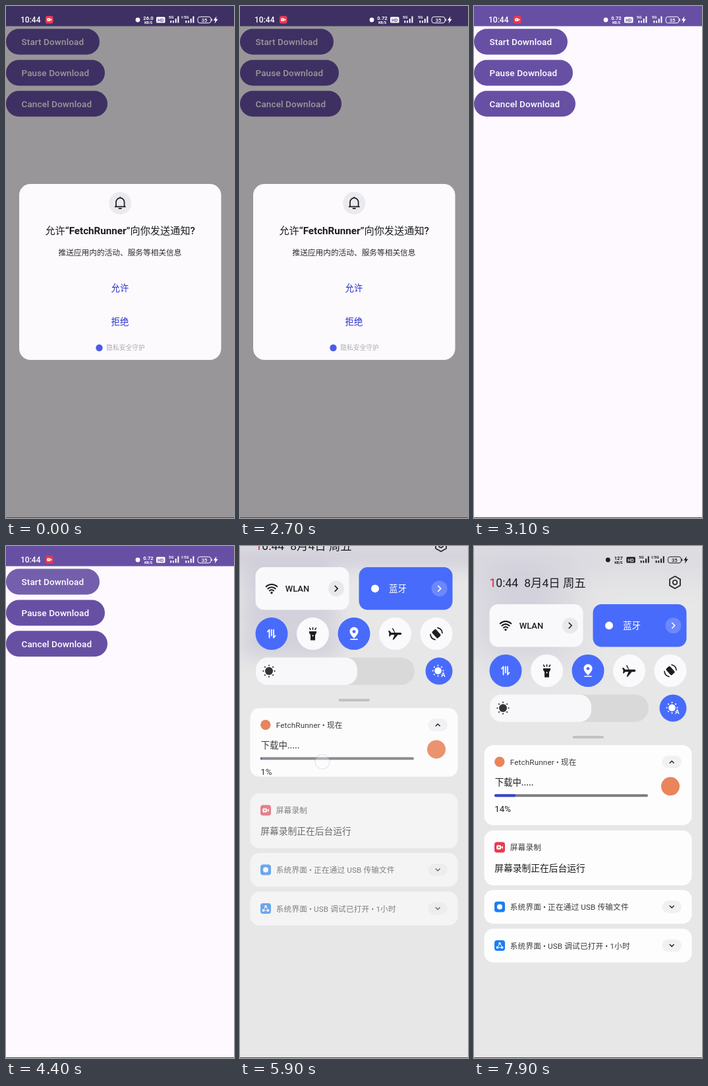
These frames come from a looping animation (346 px wide and 774 px high, 8 s). An HTML page:

```html
<!DOCTYPE html>
<html lang="zh-CN">
<head>
<meta charset="utf-8">
<style>
html, body { margin: 0; width: 100%; height: 100%; overflow: hidden; background: #fef9ff; }
svg { display: block; width: 100%; height: 100%; font-family: Roboto, "Noto Sans CJK SC", "Noto Sans CJK", sans-serif; }
text { white-space: pre; }
</style>
</head>
<body>
<svg id="stage" viewBox="0 0 346 774"></svg>
<script>
const APP = 'FetchRunner', PURPLE = '#6750a4', BLUE = '#486bfb', INK = '#1d1d21', ORANGE = '#e9845b';

const rect = (x, y, w, h, r, fill, more = '') =>
  `<rect x="${x}" y="${y}" width="${w}" height="${h}" rx="${r}" fill="${fill}" ${more}/>`;
const circle = (x, y, r, fill, more = '') => `<circle cx="${x}" cy="${y}" r="${r}" fill="${fill}" ${more}/>`;
const text = (x, y, size, fill, str, more = '') =>
  `<text x="${x}" y="${y}" font-size="${size}" fill="${fill}" ${more}>${str}</text>`;
const line = (d, color, w, more = '') =>
  `<path d="${d}" fill="none" stroke="${color}" stroke-width="${w}" stroke-linecap="round" stroke-linejoin="round" ${more}/>`;
const shape = (d, fill, more = '') => `<path d="${d}" fill="${fill}" ${more}/>`;
const at = (x, y, body, more = '') => `<g transform="translate(${x} ${y})" ${more}>${body}</g>`;
const MID = 'text-anchor="middle"', BOLD = 'font-weight="700"', MEDIUM = 'font-weight="500"';

function recorder(x, y, s) {
  return at(x, y, `<g transform="scale(${s / 16})">` + rect(0, 0, 16, 16, 4, '#e83a50') +
    rect(3.2, 4.8, 7, 6.4, 1.6, '#fff') + shape('M10 8 13 5.5V10.5Z', '#fff') +
    circle(6.7, 8, 1.2, '#e83a50') + '</g>');
}

function signal(x, color) {
  return text(x, 19.3, 6, color, '5G', BOLD) +
    [3.6, 3.6, 6.5, 10].map((h, i) => rect(x + 2.3 + i * 3.7, 25.6 - h, 2, h, .6, color)).join('');
}

function statusIcons(dx, color, back) {
  return at(dx, 0,
    circle(200, 21, 3.4, color) +
    text(216, 20.7, 7.6, color, '', `class="speed" ${MID} ${BOLD}`) +
    text(216, 26.6, 5.4, color, 'KB/S', `${MID} ${BOLD}`) +
    rect(228, 16.5, 13.5, 9, 1.5, color) + text(234.7, 23.6, 7, back, 'HD', `${MID} ${BOLD}`) +
    signal(247, color) + signal(270, color) +
    line('M266.3 16H268.5M266.3 18H268.5', color, .8, 'class="arrows"') +
    rect(291, 16.3, 20, 9.4, 3.3, 'none', `stroke="${color}" stroke-width="1"`) +
    rect(311.6, 19, 1.2, 4, .6, color) +
    text(301, 23.8, 7.6, color, '35', `${MID} ${MEDIUM}`) +
    shape('M319.5 15.5 314.8 21.8H317.6L316.6 26.5 321.6 19.8H318.6Z', color));
}

const button = (y, w, label) =>
  rect(0, y, w, 39, 19.5, PURPLE) +
  (y < 40 ? rect(0, y, w, 39, 19.5, '#fff', 'id="press" opacity="0"') : '') +
  text(23.5, y + 24.8, 13.5, '#fff', label, `${MEDIUM} letter-spacing=".12"`);

const app = rect(-60, 0, 466, 30.5, 0, PURPLE) +
  button(34.5, 142, 'Start Download') + button(81.5, 150, 'Pause Download') + button(128.3, 154, 'Cancel Download');

const dialog = rect(20, 269, 306.5, 266, 17, '#fcfafd') + circle(173.2, 298, 17, '#ebeaee') +
  line('M167 303V296.5a6.3 6.3 0 0 1 12.6 0V303M165.6 303.4H181M171.5 306.2H175M173.3 289V290', INK, 1.7) +
  text(173.2, 344.7, 15.2, INK, `允许“<tspan ${BOLD}>${APP}</tspan>”向你发送通知?`, `${MID} ${MEDIUM}`) +
  text(173, 377.4, 11.7, '#2c2c30', '推送应用内的活动、服务等相关信息', MID) +
  text(173, 431, 13.4, '#2932c8', '允许', `${MID} ${MEDIUM}`) +
  text(173, 482, 13.4, '#2932c8', '拒绝', `${MID} ${MEDIUM}`) +
  circle(141.5, 516.7, 5.2, '#4b5be6') + text(152.3, 520.4, 9.75, '#ababb0', '隐私安全守护');

const sun = (r, color) => circle(0, 0, r, color) + Array.from({ length: 8 }, (_, i) =>
  circle(0, -r - 2.6, 1.1, color, `transform="rotate(${i * 45})"`)).join('');

const arrowButton = (x, fill, color) =>
  circle(x, 120.3, 12, fill) + line(`M${x - 1.8} 116.3l4 4l-4 4`, color, 1.6);

const toggles = [
  line('M-3.5 -6V6M-3.5 -6L-6 -3M3 6V-6M3 6L5.5 3M-.2 -6V3', '#fff', 1.8),
  shape('M-5.5 -3.5H5.5V-1L3.5 2V10H-3.5V2L-5.5 -1Z', INK) +
    line('M0 -9V-6.5M-5 -8.5L-3.5 -6.3M5 -8.5L3.5 -6.3', INK, 1.6) + circle(0, 3, 1.1, '#fff'),
  shape('M0 7C-4 3 -6.5 0 -6.5 -3.5a6.5 6.5 0 0 1 13 0C6.5 0 4 3 0 7Z', '#fff') +
    circle(0, -3.2, 2.4, BLUE) + line('M-5 8.5H5', '#fff', 1.7),
  shape('M0 -1.7H4L8.5 -1.7Q11 0 8.5 1.7L4 1.7L-2 9H-4L-1 1.7L-6 1.7L-8 4H-9.5L-9 0L-10.5 -4.5H-8.5L-6 -1.7H-1L-5 -8H-3Z', INK),
  rect(-4, -6.5, 8, 13, 1.8, INK, 'transform="rotate(-42)"') +
    line('M-9 1A9 9 0 0 0 -2 9M9 -1A9 9 0 0 0 2 -9', INK, 1.7),
].map((icon, i) => at(48 + 62.5 * i, 188.5, circle(0, 0, 24.5, i % 2 || i > 3 ? '#fafafc' : BLUE) + icon)).join('');

const controls = statusIcons(3.3, INK, '#e4e2ea') +
  text(23.5, 62, 17.5, INK, '<tspan fill="#d9203e">1</tspan>0:44') + text(76.3, 62, 17.4, INK, '8月4日 周五') +
  line('M305 45.8 313 50.4V59.6L305 64.2 297 59.6V50.4Z', '#2b2b30', 1.8) +
  circle(305, 55, 3.3, 'none', 'stroke="#2b2b30" stroke-width="1.8"') +
  rect(23.5, 88, 142, 64.5, 13, '#f9f8fb') + rect(180.5, 88, 142, 64.5, 13, BLUE) +
  line('M39.7 117.2a12 12 0 0 1 16.6 0M42.4 120.4a8 8 0 0 1 11.2 0M45 123.5a4.3 4.3 0 0 1 6 0', INK, 2.1) +
  circle(48, 126.6, 1.7, INK) +
  text(68.7, 125, 13, INK, 'WLAN', MEDIUM) + arrowButton(146, '#e9e8ec', INK) +
  circle(205, 120.3, 6, '#fff') + text(226, 125, 13.5, '#fff', '蓝牙', MEDIUM) + arrowButton(302.5, '#6b88fc', '#fff') +
  toggles +
  rect(24, 224.5, 241, 41.5, 20.5, '#000', 'opacity=".06"') +
  rect(24, 224.5, 154, 41.5, 18, '#fdfcfe', 'opacity=".87"') +
  at(44, 245, sun(6, '#343438')) +
  circle(302, 245, 20.5, BLUE) + at(300.5, 244.5, sun(5.3, '#fff')) +
  text(308.5, 254.3, 9.5, '#fff', 'A', `${MID} ${BOLD} stroke="${BLUE}" stroke-width="2" paint-order="stroke"`) +
  rect(149.5, 287, 47.5, 4, 2, '#c2c1c5');

const card = (y, h, more) => rect(15.5, y, 315, h, 14, '#fdfdfe', more);
const pill = (y, id = '') => rect(285.5, y - 9.5, 29.5, 19, 9.5, '#f1f1f3') +
  line('M-3 -1.5L0 1.5L3 -1.5', INK, 1.4, `${id} transform="translate(300.2 ${y})"`);
const caption = (y, str) => text(54.8, y, 11.65, '#3c3c41', str, 'letter-spacing=".15"');

const download = card(301, 121, 'id="downloadCard"') + '<g clip-path="url(#cardClip)">' +
  circle(38.8, 326.3, 7.7, ORANGE) + caption(330.6, `${APP} • 现在`) + pill(326.4, 'id="fold"') +
  '<g id="details">' +
  text(31.7, 362, 13.4, INK, '下载中.....', MEDIUM) + circle(298, 363.3, 14, ORANGE) +
  rect(31, 375.2, 233, 4, 2, '#7d7d80') + rect(31, 375.2, 2, 4, 2, '#3443d8', 'id="bar"') +
  text(31.3, 402.3, 13.3, INK, '', 'id="percent"') + '</g></g>';

const others = card(430, 83) + recorder(31, 447.5, 16) + caption(460, '屏幕录制') +
  text(31.3, 491.6, 13.75, INK, '屏幕录制正在后台运行', MEDIUM) +
  card(520, 51) + rect(31, 537.5, 16, 16, 4, '#1b7df2') + circle(39, 545.5, 4, '#fff') +
  caption(549.8, '系统界面 • 正在通过 USB 传输文件') + pill(545.5) +
  card(578.5, 51) + rect(31, 596, 16, 16, 4, '#1b7df2') +
  line('M39 601 35.3 607H42.7Z', '#fff', 1) + [[39, 600.8], [35.3, 607], [42.7, 607]].map(p => circle(...p, 1.8, '#fff')).join('') +
  caption(608.6, '系统界面 • USB 调试已打开 • 1小时') + pill(604);

const stage = document.getElementById('stage');
stage.innerHTML = '<clipPath id="cardClip"><rect id="clipBox" x="15.5" y="301" width="315" height="121"/></clipPath>' +
  rect(0, 0, 346, 774, 0, '#fef9ff') + `<g id="app">${app}</g>` +
  rect(0, 0, 346, 774, 0, '#000', 'id="dim"') +
  `<g id="status">${text(22, 25.2, 12, '#fff', '10:44', MEDIUM)}${recorder(60, 15, 11.5)}${statusIcons(0, '#fff', PURPLE)}</g>` +
  `<g id="dialog">${dialog}</g>` + rect(0, 0, 346, 774, 0, '#e3e4e3', 'id="veil"') +
  `<g id="shade">${controls}${download}<g id="others">${others}</g></g>` +
  circle(125, 176, 11, '#fbfafd', 'id="touch" stroke="#bdb3d6" stroke-width="1.3"') +
  rect(0, 773, 346, 1, 0, '#4a474d');

const $ = id => document.getElementById(id);
const set = (id, attrs) => { for (const k in attrs) $(id).setAttribute(k, attrs[k]); };
const ramp = (t, from, to) => Math.min(1, Math.max(0, (t - from) / (to - from)));
const easeOut = u => 1 - (1 - u) ** 2;

function draw(t) {
  const asking = 1 - ramp(t, 2720, 3000);
  set('dim', { opacity: .4 * asking });
  set('dialog', { opacity: asking });
  set('press', { opacity: .085 * (ramp(t, 3980, 4200) - ramp(t, 4500, 4850)) });

  const speed = t < 1100 ? '26.0' : t < 5100 ? '0.72' : '127';
  stage.querySelectorAll('.speed').forEach(e => e.textContent = speed);
  stage.querySelectorAll('.arrows').forEach(e => e.setAttribute('opacity', t < 800 || t >= 3700 ? 1 : 0));

  const pull = easeOut(ramp(t, 5580, 6120)), opened = t >= 5580;
  const unfold = easeOut(ramp(t, 5720, 6080)), height = 51 + 70 * unfold;
  $('app').style.filter = opened ? `blur(${3 + 28 * ramp(t, 5700, 6150)}px)` : 'none';
  set('veil', { opacity: .83 * ramp(t, 5560, 5755) });
  set('status', { opacity: 1 - ramp(t, 5570, 5660) });
  set('shade', { transform: `translate(0 ${-340 * (1 - pull)})`, visibility: opened ? 'visible' : 'hidden' });
  set('others', { opacity: ramp(t, 5750, 6000) });
  set('downloadCard', { height, 'fill-opacity': .75 + .25 * unfold });
  set('clipBox', { height });
  set('details', { opacity: .5 + .5 * unfold });
  set('fold', { transform: `translate(300.2 326.4) scale(1 ${unfold > .5 ? -1 : 1})` });
  set('touch', { cy: 42 + 340 * pull, opacity: opened ? 1 - ramp(t, 5800, 5950) : 0 });

  const percent = Math.floor(1 + 13 * ramp(t, 6400, 7895));
  set('bar', { width: 2.3 * percent });
  $('percent').textContent = percent + '%';
}

function tick() {
  draw(performance.now() % 8000);
  requestAnimationFrame(tick);
}
tick();
</script>
</body>
</html>
```
